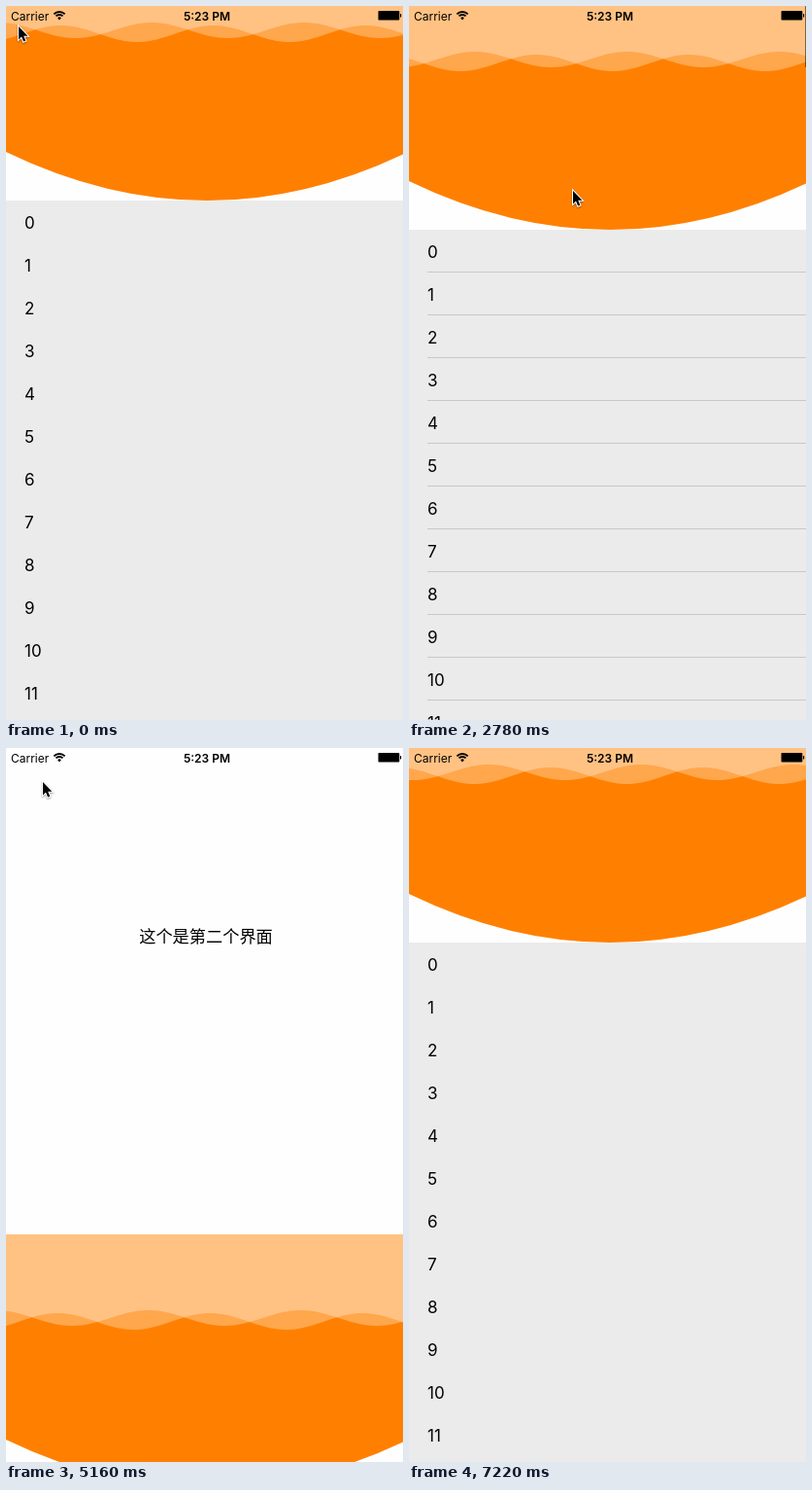
Write an HTML page with a canvas that moves like this. It is 409 px wide and 734 px high and loops after 7.24 s.

```html
<!DOCTYPE html>
<html lang="zh">
<head>
<meta charset="utf-8">
<title>Wave header list</title>
<style>
  html, body { margin: 0; width: 100%; height: 100%; overflow: hidden; background: #fefefe; }
  canvas { display: block; }
</style>
</head>
<body>
<canvas id="stage" width="409" height="734"></canvas>
<script>
const ctx = document.getElementById('stage').getContext('2d');
const W = 409, H = 734;
const SCREEN_W = 414, SCREEN_H = 736; // the phone screen is cropped slightly
const LOOP = 7240, STEP = 147.35, LEAD = 16;
const PAPER = '#fefefe';
const UI_FONT = 'Inter, Roboto, sans-serif';
const CJK_FONT = '"Noto Sans CJK SC", "Noto Sans CJK", sans-serif';
const HEADER_TOP = -61, ROW_TOP = 200, ROW_H = 44;
const WAVE_LENGTH = 157, WAVE_SPEED = 0.0312;
const RELEASE = 2890.7, OPEN_MS = 465;
const CLOSE = 4996.4, CLOSE_MS = 456.6;

const POINTER_START = { x: 13, y: 21 };
const POINTER_MOVES = [
  { at: 1000, ms: 900, x: 160, y: 79 },
  { at: 2100, ms: 1190, x: 182, y: 340 },
  { at: 3627, ms: 800, x: 38, y: 35 },
  { at: 6387, ms: 850, x: 130, y: 770 }
];

const smooth = u => u * u * (3 - 2 * u);
const progress = (t, at, ms) => smooth(Math.min(1, Math.max(0, (t - at) / ms)));

function pointerAt(t) {
  return POINTER_MOVES.reduce((pos, move) => {
    const u = progress(t, move.at, move.ms);
    return { x: pos.x + (move.x - pos.x) * u, y: pos.y + (move.y - pos.y) * u };
  }, POINTER_START);
}

// The list follows the drag with resistance, then springs back once released.
function pullAt(t) {
  if (t < 2400) return 0;
  const drag = 0.4 * Math.max(0, pointerAt(Math.min(t, RELEASE)).y - 115);
  const decay = 0.0174 * Math.max(0, t - RELEASE);
  return drag * (1 + decay) * Math.exp(-decay);
}

function rect(x, y, w, h, color) {
  ctx.fillStyle = color;
  ctx.fillRect(x, y, w, h);
}

function text(str, x, y, font, color = '#000', align = 'left') {
  ctx.font = font;
  ctx.fillStyle = color;
  ctx.textAlign = align;
  ctx.fillText(str, x, y);
}

function bowl(y) {
  ctx.beginPath();
  ctx.moveTo(0, y + HEADER_TOP);
  ctx.lineTo(0, y + 150);
  ctx.quadraticCurveTo(SCREEN_W / 2, y + 250, SCREEN_W, y + 150);
  ctx.lineTo(SCREEN_W, y + HEADER_TOP);
  ctx.fillStyle = '#ff8000';
  ctx.fill();
}

function wave(y, level, amplitude, crest) {
  ctx.beginPath();
  ctx.moveTo(0, y + HEADER_TOP);
  for (let x = 0; x <= W; x++) {
    ctx.lineTo(x, y + level - amplitude * Math.cos(2 * Math.PI * (x - crest) / WAVE_LENGTH));
  }
  ctx.lineTo(W, y + HEADER_TOP);
  ctx.fillStyle = 'rgba(255,255,255,.3)';
  ctx.fill();
}

function drawList(t, top, pull) {
  const y = Math.round(top + pull);
  const crest = 150 - WAVE_SPEED * t;
  bowl(y);
  wave(y, 25, 8, crest);
  wave(y, 28.5, 8.5, crest - 15 + WAVE_LENGTH / 2);

  rect(0, y + ROW_TOP, W, Math.max(0, H - y - ROW_TOP), '#ebebeb');
  for (let i = 0; y + ROW_TOP + i * ROW_H < H; i++) {
    const rowY = y + ROW_TOP + i * ROW_H;
    text(String(i), 19, rowY + 29, '17px ' + UI_FONT);
    if (y > 0) rect(19, rowY + 43, W, 1, '#c8c8c8');
  }
  if (pull > 1) rect(408, Math.round(top), 1, 93 - pull, 'rgba(0,0,0,.5)');
}

function drawDetail(y) {
  rect(0, y, W, SCREEN_H, PAPER);
  text('返回按钮', 16.5, y + 40.5, '15px ' + CJK_FONT, '#007aff');
  text('这个是第二个界面', 206, y + 374.5, '17.2px ' + CJK_FONT, '#000', 'center');
}

function drawStatusBar() {
  text('Carrier', 5, 15, '12px ' + UI_FONT);
  text('5:23 PM', 207, 15, '600 12px ' + UI_FONT, '#000', 'center');

  ctx.strokeStyle = '#000';
  ctx.lineWidth = 1.8;
  for (const r of [5, 8]) {
    ctx.beginPath();
    ctx.arc(55, 14, r, -Math.PI * 0.75, -Math.PI * 0.25);
    ctx.stroke();
  }
  ctx.fillStyle = '#000';
  ctx.beginPath();
  ctx.moveTo(55, 14.6);
  ctx.arc(55, 14, 2.6, -Math.PI * 0.75, -Math.PI * 0.25);
  ctx.fill();

  ctx.beginPath();
  ctx.roundRect(383.5, 5, 21.8, 9.5, 0.8);
  ctx.roundRect(406, 8, 1.2, 3.5, 0.6);
  ctx.fill();
}

function drawPointer({ x, y }) {
  const outline = [[0, 0], [0, 13.5], [3, 10.6], [5.1, 15.6], [7.3, 14.7], [5.2, 9.8], [9.4, 9.7]];
  ctx.save();
  ctx.translate(Math.round(x), Math.round(y));
  ctx.beginPath();
  outline.forEach(p => ctx.lineTo(...p));
  ctx.closePath();
  ctx.shadowColor = 'rgba(0,0,0,.4)';
  ctx.shadowBlur = 2;
  ctx.shadowOffsetY = 1;
  ctx.strokeStyle = '#fff';
  ctx.lineWidth = 2;
  ctx.stroke();
  ctx.shadowColor = 'transparent';
  ctx.fillStyle = '#000';
  ctx.fill();
  ctx.restore();
}

function draw(t) {
  const closing = t > CLOSE;
  const shown = progress(t, RELEASE, OPEN_MS) - progress(t, CLOSE, CLOSE_MS);
  const top = SCREEN_H * shown;
  const list = () => drawList(t, top, pullAt(t));
  const detail = () => drawDetail(Math.round(top - SCREEN_H));

  rect(0, 0, W, H, PAPER);
  // The returning list slides in above the detail page.
  const layers = closing ? [detail, list] : [list, detail];
  layers.forEach(layer => layer());
  drawStatusBar();
  drawPointer(pointerAt(t));
}

// The picture refreshes in discrete steps.
const heldTime = t => Math.max(0, Math.floor((t + LEAD) / STEP) * STEP - LEAD);

const start = performance.now();
function tick() {
  draw(heldTime((performance.now() - start) % LOOP));
  requestAnimationFrame(tick);
}
tick();
</script>
</body>
</html>
```
